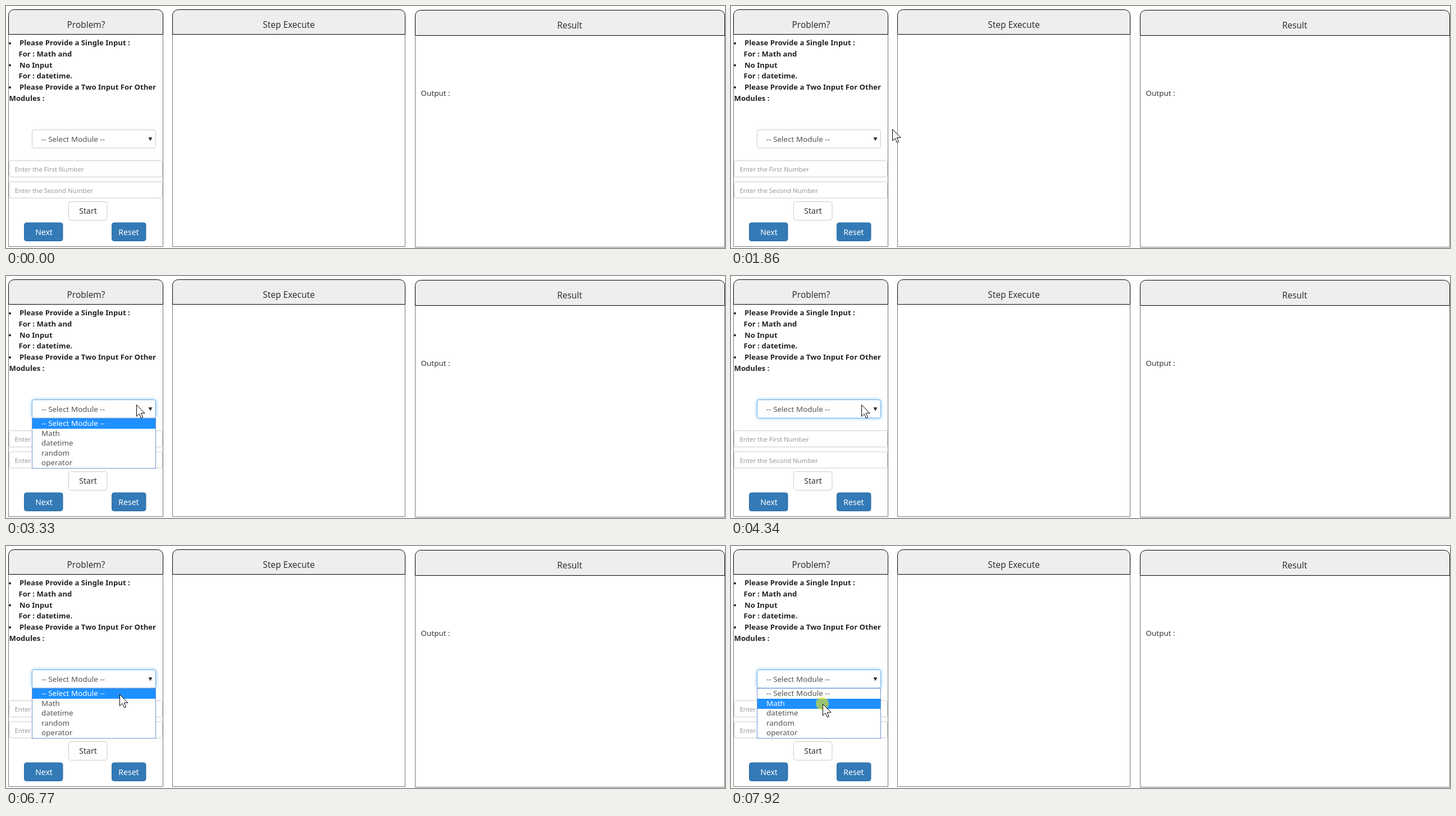
An HTML page that plays this animation: 1280 px wide and 431 px high, repeating every 8 s.

```html
<!DOCTYPE html>
<html lang="en">
<head>
<meta charset="utf-8">
<title>Module stepper</title>
<style>
  html, body { margin: 0; height: 100%; overflow: hidden; background: #fff; }
  svg { display: block; width: 100vw; height: 100vh; }
  text { font: 13.45px "Noto Sans", "Open Sans", sans-serif; fill: #333; white-space: pre; }
  .title text { font-size: 15.4px; text-anchor: middle; }
  .help text { font-size: 13.15px; font-weight: 700; fill: #222; }
  .hint text { font-size: 11.45px; fill: #999; }
  .button text { font-size: 14px; text-anchor: middle; }
  .body { fill: #fff; stroke: #777; }
  .head { fill: #eee; stroke: #000; }
  .field { fill: #fff; stroke: #ccc; }
  .primary { fill: #337ab7; stroke: #2e6da4; }
  .button .light { fill: #fff; }
  #select text, #menu text { fill: #555; }
  #select.focus .field { stroke: #66afe9; filter: drop-shadow(0 0 3px rgba(102, 175, 233, .75)); }
  #menu text.active { fill: #fff; }
</style>
</head>
<body>
<svg viewBox="0 0 1280 431">
  <g class="body">
    <path d="M4.5 50.5H279.5V428.5H4.5z"/>
    <path d="M296.5 50.5H710.5V428.5H296.5z"/>
    <path d="M728.5 52.5H1279.5V429.5H728.5z"/>
  </g>
  <g class="head">
    <path d="M4.5 50.5V16.5a10 10 0 0 1 10-10H269.5a10 10 0 0 1 10 10V50.5z"/>
    <path d="M296.5 50.5V16.5a10 10 0 0 1 10-10H700.5a10 10 0 0 1 10 10V50.5z"/>
    <path d="M728.5 52.5V17.5a10 10 0 0 1 10-10H1269.5a10 10 0 0 1 10 10V52.5z"/>
  </g>
  <g class="title">
    <text x="142.5" y="39">Problem?</text>
    <text x="503.5" y="39">Step Execute</text>
    <text x="1003.5" y="40">Result</text>
  </g>
  <g class="help">
    <text x="24" y="70">Please Provide a Single Input :</text>
    <text x="22.5" y="90">For : Math and</text>
    <text x="24" y="109.5">No Input</text>
    <text x="22.5" y="129">For : datetime.</text>
    <text x="24" y="149">Please Provide a Two Input For Other</text>
    <text x="5.5" y="168.5">Modules :</text>
    <g fill="#222">
      <circle cx="7" cy="66.5" r="2"/>
      <circle cx="7" cy="105.5" r="2"/>
      <circle cx="7" cy="145" r="2"/>
    </g>
  </g>
  <text x="738.5" y="160">Output :</text>

  <g class="hint">
    <rect class="field" x="5.5" y="275.5" width="273" height="29" rx="3"/>
    <rect class="field" x="5.5" y="313" width="273" height="29" rx="3"/>
    <text x="15.5" y="295">Enter the First Number</text>
    <text x="15.5" y="332.5">Enter the Second Number</text>
  </g>
  <g class="button">
    <rect class="field" x="111.5" y="348.5" width="68.5" height="33" rx="4"/>
    <rect class="primary" x="32.5" y="386" width="68.5" height="32.5" rx="4"/>
    <rect class="primary" x="188.5" y="386" width="60.5" height="32.5" rx="4"/>
    <text x="146" y="370">Start</text>
    <text class="light" x="67.5" y="407.5">Next</text>
    <text class="light" x="218.5" y="407.5">Reset</text>
  </g>

  <g id="select">
    <rect class="field" x="46.5" y="220.5" width="220" height="32.5" rx="3.5"/>
    <text x="63" y="241.5">-- Select Module --</text>
    <path d="M253.5 234h7l-3.5 6.5z" fill="#333"/>
  </g>
  <path id="blank" d="M46 254H267V343H46z" fill="#fff"/>
  <g id="menu">
    <rect x="46.5" y="253.5" width="220" height="89" fill="#fff" stroke="#6f94d2"/>
    <rect id="highlight" x="47" width="219" height="18" fill="#1e90ff"/>
  </g>
  <circle id="click" r="11.5" fill="#ffee00" opacity=".55"/>
  <path id="cursor" d="M.5 .5V21l4.7-4.5 3.3 7.6 3-1.3-3.2-7.5h6.7z" fill="#fff" stroke="#000"/>
</svg>
<script>
const LOOP = 8000;
const $ = id => document.getElementById(id);
const show = (node, on) => { node.style.display = on ? '' : 'none'; };
const within = (t, [from, to]) => t >= from && t < to;

const options = ['-- Select Module --', 'Math', 'datetime', 'random', 'operator'].map((label, i) => {
  const text = document.createElementNS('http://www.w3.org/2000/svg', 'text');
  text.textContent = label;
  text.setAttribute('x', 63);
  text.setAttribute('y', 267.3 + i * 17.5);
  $('menu').append(text);
  return text;
});

// start, end, number of steps, from, to
const moves = [
  [760, 940, 3, [1252, 446], [852, 320]],
  [1310, 1460, 3, [852, 320], [521, 247]],
  [1770, 1860, 2, [521, 247], [287, 219]],
  [2170, 2400, 4, [287, 219], [231.5, 229]],
  [5600, 5800, 4, [231.5, 229], [260.5, 237]],
  [6320, 6320, 1, [260.5, 237], [258, 237]],
  [6600, 6770, 3, [258, 237], [202, 264]],
  [6840, 7070, 4, [202, 264], [177, 278]],
  [7410, 7610, 4, [177, 278], [163, 281]]
];
const clicks = [[2590, 2700], [3740, 3800], [4260, 4340], [7920, LOOP]];
const openings = [[3330, 3740], [6200, LOOP]];

function cursorAt(t) {
  const move = moves.findLast(m => t >= m[0]);
  if (!move) return null;
  const [start, end, steps, from, to] = move;
  const interval = (end - start) / (steps - 1) || 1;
  const step = Math.min(steps, Math.floor((t - start) / interval + 1e-6) + 1);
  return from.map((v, i) => v + (to[i] - v) * step / steps);
}

function draw(t) {
  const point = cursorAt(t);
  const clicking = clicks.some(span => within(t, span));
  show($('cursor'), point);
  show($('click'), clicking);
  if (point) {
    const [x, y] = point.map(Math.round);
    $('cursor').setAttribute('transform', `translate(${x} ${y})`);
    $('click').setAttribute('transform', `translate(${x - .5} ${y - .5})`);
  }

  $('select').classList.toggle('focus', t >= 3330);
  show($('blank'), t >= 6110);
  show($('menu'), openings.some(span => within(t, span)));
  $('menu').style.opacity = within(t, [6200, 6320]) ? .5 : 1;

  const active = t >= 7410 ? 1 : 0;
  $('highlight').setAttribute('y', 254 + active * 18);
  options.forEach((text, i) => text.classList.toggle('active', i === active));
}

const begin = performance.now();
function tick() {
  draw((performance.now() - begin) % LOOP);
  requestAnimationFrame(tick);
}
tick();
</script>
</body>
</html>
```
